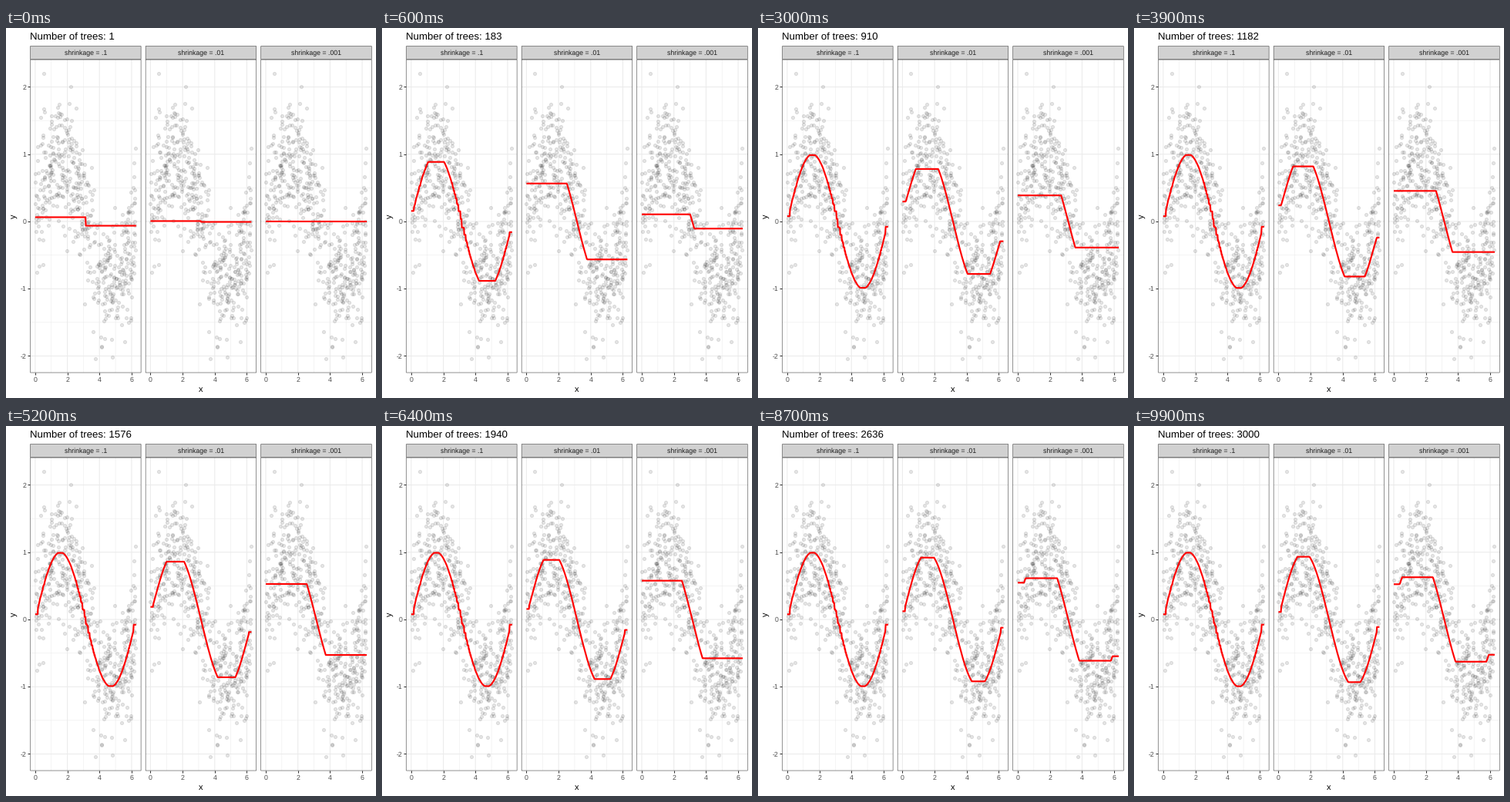
A matplotlib script for the animation above (10000 ms loop, 480x480 px).

```python
import numpy as np
import matplotlib.pyplot as plt
from matplotlib.animation import FuncAnimation
from matplotlib.patches import Rectangle
from matplotlib.transforms import Affine2D

plt.rcParams.update({"font.family": "Liberation Sans",
                     "text.hinting": "none", "path.snap": False})

SIZE, DPI = 480, 72
FRAMES, INTERVAL = 100, 100
TREES = np.rint(np.linspace(1, 3000, FRAMES)).astype(int)
SHRINKAGES = [".1", ".01", ".001"]

LEFT, RIGHT, GAP = 31.3, 474.5, 5.5
STRIP, TOP, BOTTOM = 23.3, 40.8, 447.3
WIDTH = (RIGHT - LEFT - 2 * GAP) / 3
XLIM = (-0.1 * np.pi, 2.1 * np.pi)
YLIM = (-2.25, 2.409)
DARK, MID, GRID = "#333333", "#4d4d4d", "#ebebeb"


def noisy_sine(n=520):
    """Random cloud around sin(x), plus its extreme points."""
    rng = np.random.default_rng(123)
    x = rng.uniform(0, 2 * np.pi, n)
    y = np.sin(x) + rng.normal(0, 0.48, n)
    keep = (y > -2.02) & (y < 1.8)
    extremes = [(0.53, 2.2), (2.21, 2.0), (6.25, 1.09), (3.73, -2.04)]
    return np.vstack([np.column_stack([x, y])[keep], extremes])


def boost(x, rate, leaf=7):
    """Boost regression stumps on sin(x); return the fit at each tree count."""
    n = len(x)
    target = np.sin(x)
    resid = target.copy()
    cuts = np.arange(leaf, n - leaf + 1)
    wanted, fits = set(TREES.tolist()), []
    for tree in range(1, TREES[-1] + 1):
        sums = np.cumsum(resid)
        left = sums[cuts - 1]
        right = sums[-1] - left
        best = np.argmax(left**2 / cuts + right**2 / (n - cuts))
        cut = cuts[best]
        resid[:cut] -= rate * left[best] / cut
        resid[cut:] -= rate * right[best] / (n - cut)
        if tree in wanted:
            fits.append(target - resid)
    return fits


fig = plt.figure(figsize=(SIZE / DPI, SIZE / DPI), dpi=DPI, facecolor="white")
px = Affine2D().scale(1 / SIZE, -1 / SIZE).translate(0, 1) + fig.transFigure


def label(x, y, text, size, color="black", ha="center", **kw):
    return fig.text(x, y, text, fontsize=size, color=color, ha=ha,
                    va="baseline", transform=px, **kw)


def box(left, top, bottom, face="none", line=0.53):
    """Panel-wide rectangle whose outline lies inside its edges."""
    fig.add_artist(Rectangle((left + line / 2, top + line / 2),
                             WIDTH - line, bottom - top - line, transform=px,
                             facecolor=face, edgecolor=DARK, linewidth=line))


def make_panel(left, name, first):
    ax = fig.add_axes([left / SIZE, 1 - BOTTOM / SIZE,
                       WIDTH / SIZE, (BOTTOM - TOP) / SIZE])
    ax.set(xlim=XLIM, ylim=YLIM)
    ax.set_axisbelow(True)
    ax.set_xticks([0, 2, 4, 6], labels=[])
    ax.set_yticks(range(-2, 3), labels=[])
    ax.set_xticks([1, 3, 5], minor=True)
    ax.set_yticks(np.arange(-1.5, 2), minor=True)
    ax.grid(color=GRID, linewidth=1.07)
    ax.grid(which="minor", color=GRID, linewidth=0.53)
    ax.tick_params(length=2.75, width=1.07, color=DARK, left=first)
    ax.tick_params(which="minor", length=0)
    ax.spines[:].set_visible(False)

    box(left, TOP, BOTTOM)
    box(left, STRIP, TOP, "#d1d1d1")
    label(left + WIDTH / 2, 34.7, f"shrinkage = {name}", 8.8, "#1a1a1a")
    for tick in (0, 2, 4, 6):
        at = left + WIDTH * (tick - XLIM[0]) / (XLIM[1] - XLIM[0])
        label(at, 459, str(tick), 8.8, MID)

    ax.scatter(*points.T, s=4.2**2, facecolor=(0, 0, 0, 0.1),
               edgecolor=(0, 0, 0, 0.1), linewidth=0.95, zorder=2)
    return ax.plot([], [], color="red", linewidth=2.13, zorder=3,
                   solid_capstyle="butt")[0]


grid_x = np.linspace(0, 2 * np.pi, 250)
points = noisy_sine()
fits = [boost(grid_x, float(name)) for name in SHRINKAGES]
lines = [make_panel(LEFT + i * (WIDTH + GAP), name, i == 0)
         for i, name in enumerate(SHRINKAGES)]

for tick in range(-2, 3):
    at = BOTTOM - (BOTTOM - TOP) * (tick - YLIM[0]) / (YLIM[1] - YLIM[0])
    label(26.4, at + 3.1, str(tick), 8.8, MID, ha="right")
label((LEFT + RIGHT) / 2, 471.6, "x", 11)
label(14, (TOP + BOTTOM) / 2, "y", 11, rotation=90, rotation_mode="anchor")
title = label(LEFT, 15, "", 13.2, ha="left")


def update(frame):
    title.set_text(f"Number of trees: {TREES[frame]}")
    for line, fit in zip(lines, fits):
        line.set_data(grid_x, fit[frame])
    return [title, *lines]


anim = FuncAnimation(fig, update, frames=FRAMES, interval=INTERVAL,
                     repeat=True, repeat_delay=0, blit=False)
plt.show()
```
